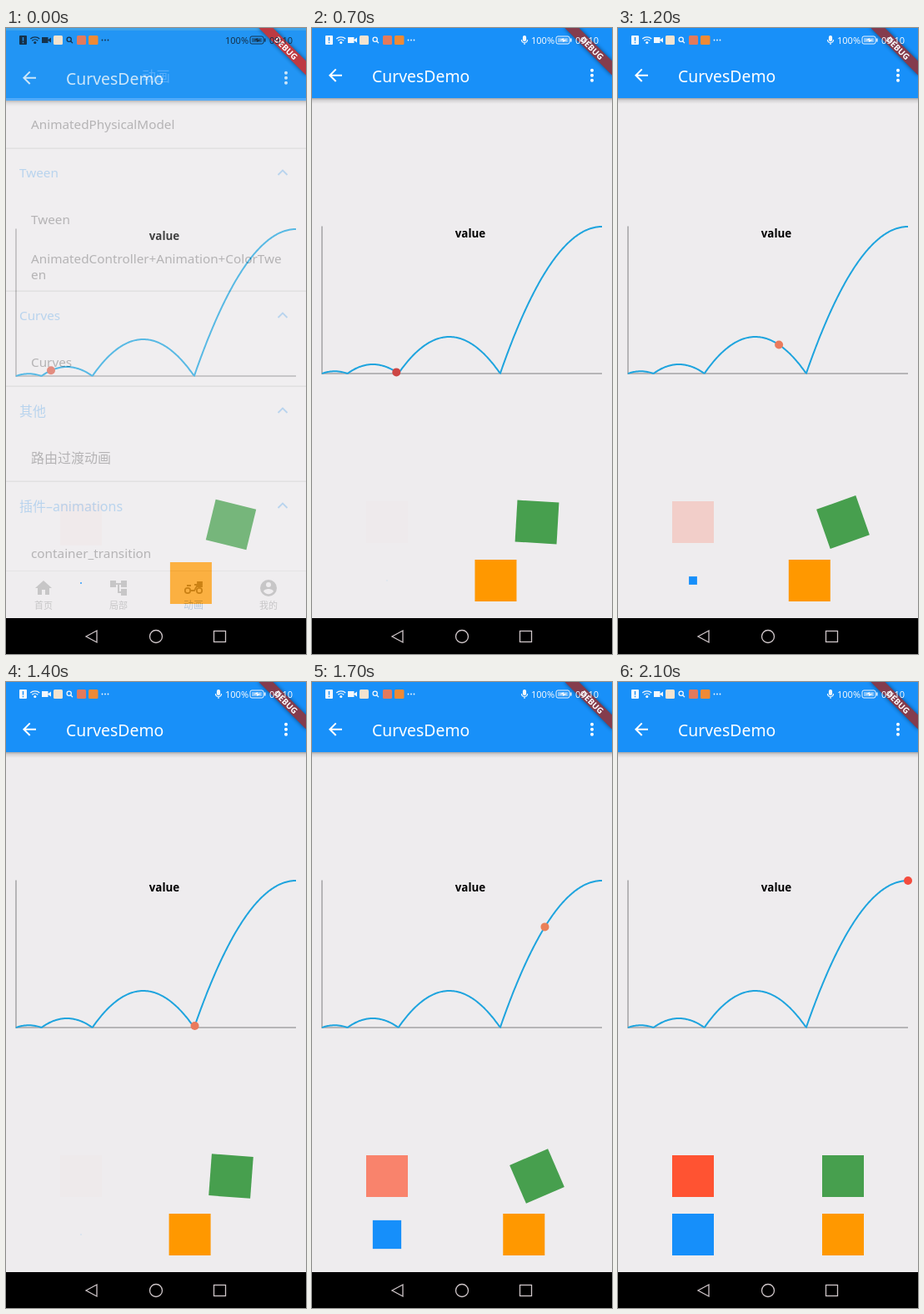
An HTML page that plays this animation: 360 by 750 pixels, repeating every 2700 ms.

```html
<!DOCTYPE html>
<html lang="zh">
<head>
<meta charset="utf-8">
<title>CurvesDemo</title>
<style>
html, body { margin: 0; width: 100%; height: 100%; overflow: hidden; background: #eeecee; }
svg { display: block; width: 360px; height: 750px; }
text { font-family: 'Noto Sans', 'Noto Sans CJK SC', 'Noto Sans CJK', sans-serif; }
#list text { font-size: 15.3px; fill: #1c1c1c; }
#list .cjk { font-size: 16px; }
#list .head { fill: #2a93ee; }
#list .tab { font-size: 11px; fill: #606060; text-anchor: middle; }
</style>
</head>
<body>
<svg viewBox="0 0 360 750">
  <defs>
    <linearGradient id="shade" x2="0" y2="1">
      <stop offset="0" stop-color="#000" stop-opacity=".3"/>
      <stop offset=".4" stop-color="#000" stop-opacity=".1"/>
      <stop offset="1" stop-color="#000" stop-opacity="0"/>
    </linearGradient>
    <filter id="soft" x="-20%" y="-80%" width="140%" height="260%"><feGaussianBlur stdDeviation="2.5"/></filter>
  </defs>

  <g id="list">
    <rect width="360" height="707" fill="#f6f5f7"/>
    <g id="rows"></g>
    <rect y="651" width="360" height="56" fill="#f3f3f4"/>
    <rect y="650" width="360" height="1" fill="#d0d0d0"/>
    <g fill="#606060">
      <path transform="translate(33 659)" d="M10 20v-6h4v6h5v-8h3L12 3 2 12h3v8z"/>
      <path transform="translate(123 659)" d="M22 11V3h-7v3H9V3H2v8h7V8h2v10h4v3h7v-8h-7v3h-2V8h2v3z"/>
      <path transform="translate(303 659)" d="M12 2a10 10 0 1 0 0 20a10 10 0 1 0 0-20zm0 3a3 3 0 1 1 0 6a3 3 0 1 1 0-6zm0 14.2c-2.5 0-4.7-1.3-6-3.2 0-2 4-3.1 6-3.1s6 1.1 6 3.1c-1.3 1.9-3.5 3.2-6 3.2z"/>
    </g>
    <g fill="none" stroke="#404850" stroke-width="1.8">
      <circle cx="218" cy="674" r="3.2"/>
      <circle cx="232" cy="674" r="3.2"/>
      <path d="M221 674h5l4-7h-4M217 668h5"/>
      <path d="M230 664h5v5h-5z" fill="#404850"/>
    </g>
    <text class="tab" x="45" y="696">首页</text>
    <text class="tab" x="135" y="696">局部</text>
    <text class="tab" x="225" y="696" style="font-size:12px;fill:#2a70b0">动画</text>
    <text class="tab" x="315" y="696">我的</text>
    <rect width="360" height="84" fill="#3fa3ea"/>
    <text x="180" y="64" text-anchor="middle" style="font-size:17px;fill:#fff">动画</text>
  </g>

  <g id="page">
    <rect width="360" height="707" fill="#eeecee"/>
    <rect y="84" width="360" height="7" fill="url(#shade)"/>
    <rect width="360" height="84" fill="#1890f9"/>
    <path transform="translate(16 44.7)" fill="#fff" d="M20 11H7.83l5.59-5.59L12 4l-8 8 8 8 1.41-1.41L7.83 13H20z"/>
    <text x="72" y="65" font-size="19.4" font-weight="500" fill="#fff">CurvesDemo</text>
    <g fill="#fff">
      <circle cx="336" cy="50.8" r="2"/><circle cx="336" cy="56.8" r="2"/><circle cx="336" cy="62.8" r="2"/>
    </g>
    <path d="M12 237.500V414H348" fill="none" stroke="#b6b5b7" stroke-width="2"/>
    <path id="curve" fill="none" stroke="#1ea4de" stroke-width="2"/>
    <text x="190" y="251" font-size="13.4" font-weight="700" text-anchor="middle" fill="#000">value</text>
    <circle id="dot" r="5"/>
    <rect id="fade" x="65" y="567" width="50" height="50" fill="#ff5332"/>
    <rect id="spin" x="245" y="567" width="50" height="50" fill="#479f4e"/>
    <rect id="grow" fill="#168ffa"/>
    <rect id="slide" y="637" width="50" height="50" fill="#ff9800"/>
  </g>

  <g transform="translate(360 0) rotate(45)">
    <rect x="-40" y="28" width="80" height="12" fill="#000" opacity=".5" filter="url(#soft)"/>
    <rect id="ribbon" x="-40" y="28" width="80" height="12"/>
    <text y="37.700" font-size="10" font-weight="900" text-anchor="middle" fill="#fff">DEBUG</text>
  </g>

  <g id="status">
    <path fill="currentColor" fill-rule="evenodd" d="M17 9h7q1 0 1 1v9q0 1-1 1h-7q-1 0-1-1v-9q0-1 1-1zM19.800 11v4.500h1.400V11zM19.800 16.700v1.500h1.400v-1.500z"/>
    <g fill="none" stroke="currentColor" stroke-width="1.300">
      <path d="M29.300 13a8 8 0 0 1 11 0M31.300 15.300a5 5 0 0 1 7 0"/>
      <circle cx="75.700" cy="13.800" r="2.600"/><path d="M77.600 15.700l2.400 2.400"/>
      <rect x="293" y="10" width="16" height="9" rx="2" stroke-width="1"/>
    </g>
    <g fill="currentColor">
      <circle cx="34.800" cy="17.500" r="1.600"/>
      <path d="M43 11h7.500v7H43zM50.500 14l3.500-2.500v6l-3.500-2.500z"/>
      <rect x="295" y="12" width="12" height="5" opacity=".5"/>
      <path d="M297 14.800l5-2.800v2h4l-5 3v-2.200zM310 12.500h1.500v4H310z"/>
      <circle cx="115.500" cy="14.500" r=".9"/><circle cx="119" cy="14.500" r=".9"/><circle cx="122.500" cy="14.500" r=".9"/>
      <text x="263" y="18.700" font-size="11">100%</text>
      <text x="316" y="18.700" font-size="11">09:10</text>
    </g>
    <g id="mic" fill="none" stroke="currentColor" stroke-width="1.200">
      <rect x="253.500" y="9.500" width="3" height="6" rx="1.500" fill="currentColor"/>
      <path d="M251.500 14a3.500 3.500 0 0 0 7 0M255 17.500v2.500"/>
    </g>
    <rect x="57" y="9" width="11" height="11" rx="1.500" fill="#f3e3cf"/>
    <rect x="85" y="9" width="11" height="11" rx="1.500" fill="#e27a5c"/>
    <rect x="99" y="9" width="11.500" height="11" rx="1.500" fill="#ee8a35"/>
  </g>

  <rect y="707" width="360" height="43" fill="#000"/>
  <g fill="none" stroke="#cfc6c9" stroke-width="1.300">
    <path d="M96 729l13-7v14z"/>
    <circle cx="180" cy="729" r="7.500"/>
    <rect x="249.500" y="722.500" width="14" height="13"/>
  </g>
</svg>
<script>
const LOOP = 2700, STEP = 100, ENTER = 500;
const $ = id => document.getElementById(id);
const set = (id, attrs) => {
  for (const k in attrs) $(id).setAttribute(k, attrs[k]);
};

// time, curve progress, dot colour
const keys = [
  [500, 0.158, '#cd4644'],
  [900, 0.3735, '#c4415a'],
  [1200, 0.539, '#ea7a5c'],
  [1600, 0.738, '#ea8058'],
  [1900, 0.912, '#fb5a41'],
  [2100, 1, '#f44c3e']
];

function bounceOut(t) {
  const k = 7.5625, d = 2.75;
  if (t < 1 / d) return k * t * t;
  if (t < 2 / d) return k * (t - 1.5 / d) ** 2 + 0.75;
  if (t < 2.5 / d) return k * (t - 2.25 / d) ** 2 + 0.9375;
  return k * (t - 2.625 / d) ** 2 + 0.984375;
}
const bounceIn = t => 1 - bounceOut(1 - t);
const px = t => 12 + 336 * t;
const py = v => 414 - 176 * v;

function buildRows() {
  const items = [
    ['AnimatedPhysicalModel', 121], ['Tween', 235],
    ['AnimatedController+Animation+ColorTwe', 282], ['en', 301],
    ['Curves', 406], ['路由过渡动画', 521], ['container_transition', 635]
  ];
  const heads = [['Tween', 179, 144], ['Curves', 350, 315], ['其他', 465, 429], ['插件–animations', 579, 543]];
  const label = (s, x, y, cls) =>
    `<text class="${cls}${s.charCodeAt(0) > 255 ? ' cjk' : ''}" x="${x}" y="${y}">${s}</text>`;
  let out = items.map(([s, y]) => label(s, 30, y, 'item')).join('');
  for (const [s, y, line] of heads) {
    out += label(s, 16, y, 'head') +
      `<rect y="${line - 0.5}" width="360" height="1.5" fill="#c0c0c0"/>` +
      `<path d="M326.500 ${line + 32}l5.500-5.500 5.500 5.500" fill="none" stroke="#2a93ee" stroke-width="1.800"/>`;
  }
  $('rows').innerHTML = out;
}

function buildCurve() {
  const n = 336, pts = [];
  for (let i = 0; i <= n; i++) pts.push(px(i / n).toFixed(2) + ' ' + py(bounceIn(i / n)).toFixed(2));
  set('curve', { d: 'M' + pts.join('L') });
}

function progress(ms) {
  if (ms < ENTER) return [0.125, '#dc6654'];
  let i = keys.length - 1;
  while (keys[i][0] > ms) i--;
  const a = keys[i], b = keys[i + 1];
  if (!b) return [a[1], a[2]];
  return [a[1] + (b[1] - a[1]) * (ms - a[0]) / (b[0] - a[0]), a[2]];
}

function draw(now) {
  const ms = Math.floor(now % LOOP / STEP) * STEP;
  const entering = ms < ENTER;
  const [t, tint] = progress(ms);
  const v = bounceIn(t), size = 50 * v;

  set('list', { visibility: entering ? 'visible' : 'hidden' });
  set('page', { opacity: entering ? 0.73 : 1, transform: `translate(0 ${entering ? 3 : 0})` });
  set('ribbon', { fill: entering ? '#bd3a42' : '#843c4d' });
  set('status', { color: entering ? '#15324c' : '#f2f7fc' });
  set('mic', { visibility: entering ? 'hidden' : 'visible' });

  set('dot', { cx: px(t), cy: py(v), fill: tint });
  set('fade', { opacity: v });
  set('spin', { transform: `rotate(${360 * v} 270 592)` });
  set('grow', { x: 90 - size / 2, y: 662 - size / 2, width: size, height: size });
  set('slide', { x: 195 + size });
}

buildRows();
buildCurve();
const start = performance.now();
function tick() {
  draw(performance.now() - start);
  requestAnimationFrame(tick);
}
tick();
</script>
</body>
</html>
```
